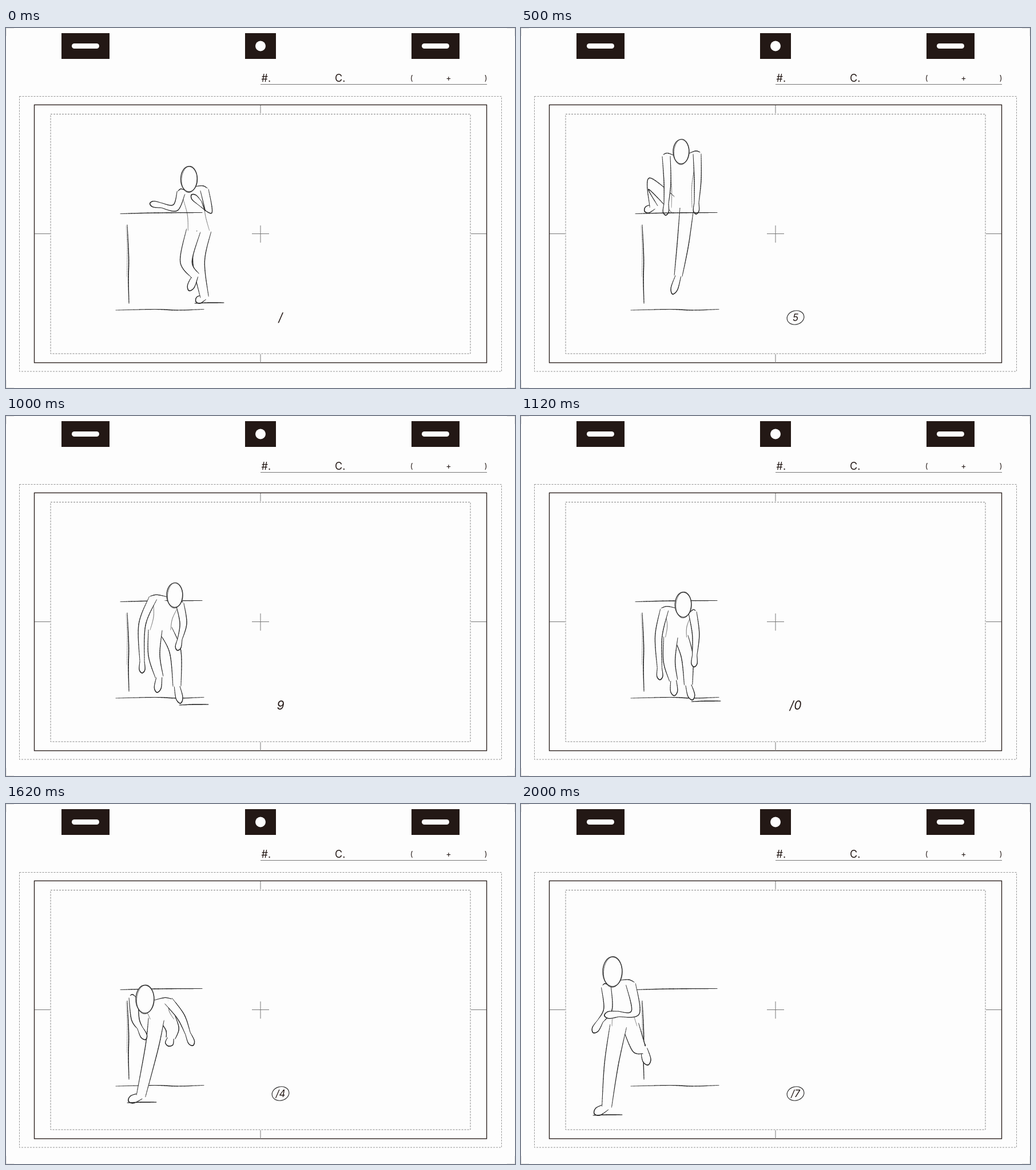
An HTML page with a canvas for the animation above (2.08 s loop, 890 px wide and 629 px high).

```html
<!DOCTYPE html>
<html lang="en">
<head>
<meta charset="utf-8">
<title>Vault over a table, pencil test</title>
<style>
html, body { margin: 0; width: 100%; height: 100%; overflow: hidden; background: #fdfdfd; }
canvas { display: block; width: 100vw; height: 100vh; }
</style>
</head>
<body>
<canvas id="stage" width="890" height="629"></canvas>
<script>
const ctx = document.getElementById('stage').getContext('2d');
const LOOP = 2080, DRAWINGS = 17, FLOOR = 470, INK = '#231815', PAPER = '#fdfdfd';
const RINGED = [5, 7, 14, 17];

// Key poses. head: centre and half width; arms: shoulder, elbow, wrist; legs: knee, ankle, toe.
const poses = {
  1: {
    head: [320, 264, 14.5], pelvis: [337, 354],
    arms: [[[306, 288], [296, 314], [272, 310]], [[347, 283], [354, 321], [339, 306]]],
    legs: [[[315, 408], [331, 433], [320, 459]], [[337, 408], [347, 470], [332, 478]]]
  },
  5: {
    head: [280, 216, 14], pelvis: [281, 314],
    arms: [[[254, 224], [256, 270], [254, 307]], [[308, 220], [309, 265], [307, 305]]],
    legs: [[[224, 272], [232, 312], [216, 320]], [[283, 378], [275, 433], [265, 465]]]
  },
  7: {
    head: [310, 226, 14], pelvis: [275, 284],
    arms: [[[268, 231], [231, 218], [192, 228]], [[317, 240], [317, 276], [311, 310]]],
    legs: [[[253, 335], [244, 390], [240, 422]], [[297, 314], [296, 333], [279, 332]]]
  },
  9: {
    head: [295, 313, 14], pelvis: [270, 374],
    arms: [[[257, 318], [238, 365], [238, 429]], [[304, 328], [310, 362], [304, 390]]],
    legs: [[[259, 418], [268, 456], [264, 483]], [[296, 412], [299, 472], [305, 502]]]
  },
  12: {
    head: [261, 363, 15], pelvis: [273, 412],
    arms: [[[238, 380], [246, 425], [251, 463]], [[292, 373], [297, 420], [303, 474]]],
    legs: [[[260, 450], [264, 474], [276, 500]], [[280, 440], [280, 465], [290, 484]]]
  },
  14: {
    head: [243, 341, 16], pelvis: [273, 376],
    arms: [[[223, 338], [226, 375], [234, 391]], [[284, 344], [306, 372], [318, 401]]],
    legs: [[[255, 425], [236, 510], [214, 519]], [[291, 394], [288, 409], [284, 423]]]
  },
  17: {
    head: [160, 293, 17], pelvis: [181, 388],
    arms: [[[149, 320], [152, 358], [139, 379]], [[192, 315], [200, 364], [170, 367]]],
    legs: [[[158, 455], [150, 529], [128, 541]], [[206, 426], [215, 428], [222, 456]]]
  }
};

const lerp = (a, b, u) => a + (b - a) * u;
const mix = (a, b, u) => typeof a === 'number' ? lerp(a, b, u) : a.map((v, i) => mix(v, b[i], u));
const shift = ([x, y], [dx, dy], k) => [x + dx * k, y + dy * k];
const direction = ([x1, y1], [x2, y2]) => {
  const length = Math.hypot(x2 - x1, y2 - y1) || 1;
  return [(x2 - x1) / length, (y2 - y1) / length];
};
const normal = (a, b) => {
  const [dx, dy] = direction(a, b);
  return [-dy, dx];
};

// Catmull-Rom curve through a few points.
function curve(points, steps = 24) {
  const last = points.length - 1;
  const at = i => points[Math.max(0, Math.min(last, i))];
  return Array.from({ length: steps + 1 }, (_, k) => {
    const s = k / steps * last, i = Math.min(Math.floor(s), last - 1), u = s - i;
    return [0, 1].map(axis => {
      const [a, b, c, d] = [-1, 0, 1, 2].map(n => at(i + n)[axis]);
      return b + u / 2 * (c - a + u * (2 * a - 5 * b + 4 * c - d + u * (3 * (b - c) + d - a)));
    });
  });
}

// A line that presses hardest in the middle and thins toward its ends.
function pencil(points, width) {
  const tone = Math.max(40, 170 - 105 * width);
  ctx.strokeStyle = `rgb(${tone},${tone},${tone})`;
  ctx.lineCap = 'round';
  const path = curve(points);
  path.slice(1).forEach((end, i) => {
    ctx.lineWidth = width * (.6 + .5 * Math.sin(Math.PI * (i + .5) / path.length));
    ctx.beginPath();
    ctx.moveTo(...path[i]);
    ctx.lineTo(...end);
    ctx.stroke();
  });
}

function cover(points) {
  ctx.fillStyle = PAPER;
  ctx.beginPath();
  points.forEach(p => ctx.lineTo(...p));
  ctx.fill();
}

function drawLimb(joints, halfWidths, width) {
  const [left, right] = [1, -1].map(side => joints.map((joint, i) =>
    shift(joint, normal(joints[Math.max(0, i - 1)], joints[Math.min(2, i + 1)]), side * halfWidths[i])));
  cover([...curve(left), ...curve(right).reverse()]);
  pencil(left, width);
  pencil(right, width);
}

// Hand or foot: a rounded leaf from the joint to its tip.
function drawTip(joint, tip, halfWidth) {
  const across = normal(joint, tip), middle = mix(joint, tip, .7);
  const outline = [shift(joint, across, halfWidth * .8), shift(middle, across, halfWidth), tip,
    shift(middle, across, -halfWidth), shift(joint, across, -halfWidth * .8)];
  cover(curve(outline));
  pencil(outline, 1.3);
}

function drawRing(cx, cy, rx, ry, tilt, width) {
  ctx.strokeStyle = '#333';
  ctx.lineWidth = width;
  ctx.beginPath();
  ctx.ellipse(cx, cy, rx, ry, tilt, 0, 7);
  ctx.stroke();
}

function drawFigure({ head, pelvis, arms, legs }) {
  const [cx, cy, rx] = head, ry = rx * 1.53, scale = rx / 14;
  const sized = values => values.map(v => v * scale);
  const hips = [-1, 1].map(side => shift(pelvis, [side, 0], 9 * scale));

  for (const side of [1, 0]) {
    const [knee, ankle, toe] = legs[side];
    drawTip(ankle, toe, 6 * scale);
    drawLimb([hips[side], knee, ankle], sized([12, 10, 7]), 1.2);
  }

  const shoulders = arms.map(arm => arm[0]);
  cover([shoulders[0], shoulders[1], hips[1], hips[0]]);
  shoulders.forEach((shoulder, side) => {
    const out = side ? 1 : -1, hip = shift(hips[side], [out, 0], 9 * scale);
    pencil([shoulder, shift(mix(shoulder, hip, .55), [-out, 0], 4), hip], .7);
  });

  arms.forEach(([shoulder, elbow, wrist], side) => {
    drawTip(wrist, shift(wrist, direction(elbow, wrist), 20 * scale), 5 * scale);
    drawLimb([shoulder, elbow, wrist], sized([7, 6, 4]), 1.2);
    const [dx, dy] = direction([cx, cy], shoulder);
    const neck = [cx + dx * rx, cy + dy * ry], tip = shift(shoulder, [side ? 1 : -1, -.6], 5 * scale);
    pencil([neck, shift(mix(neck, tip, .6), [0, -1], 3), tip], 1.1);
  });

  ctx.fillStyle = PAPER;
  ctx.beginPath();
  ctx.ellipse(cx, cy, rx, ry, 0, 0, 7);
  ctx.fill();
  drawRing(cx, cy, rx, ry, 0, 1.4);
  drawRing(cx + .5, cy + .5, rx - 1, ry + 1, .07, .7);

  const [x, y] = legs.map(leg => leg[2]).sort((a, b) => b[1] - a[1])[0];
  if (y > FLOOR) pencil([[x - 2, y + 3], [x + 25, y + 2], [x + 49, y + 2]], 1.4);
}

function drawTable() {
  pencil([[200, 324.5], [260, 323], [343, 322.5]], 1.3);
  pencil([[192, 493], [260, 491.5], [300, 493], [346, 491.5]], 1.2);
  pencil([[212, 344], [214.5, 400], [214, 440], [215, 481]], 1.5);
  pencil([[210, 345], [212, 385], [211, 435]], .5);
}

function line(x1, y1, x2, y2, color = '#777') {
  ctx.strokeStyle = color;
  ctx.lineWidth = 1;
  ctx.beginPath();
  ctx.moveTo(x1, y1);
  ctx.lineTo(x2, y2);
  ctx.stroke();
}

function box(x, y, w, h, color, width, dash = []) {
  ctx.setLineDash(dash);
  ctx.strokeStyle = color;
  ctx.lineWidth = width;
  ctx.strokeRect(x, y, w, h);
  ctx.setLineDash([]);
}

function pegHole(center, w, holeWidth, holeHeight) {
  ctx.fillStyle = INK;
  ctx.fillRect(center - w / 2, 9, w, 45);
  ctx.fillStyle = PAPER;
  ctx.beginPath();
  ctx.roundRect(center - holeWidth / 2, 31.5 - holeHeight / 2, holeWidth, holeHeight, holeHeight / 2);
  ctx.fill();
}

function text(value, x, y, font, align = 'left') {
  ctx.font = `${font} Inter, sans-serif`;
  ctx.textAlign = align;
  ctx.fillStyle = INK;
  ctx.fillText(value, x, y);
}

function drawSheet() {
  ctx.fillStyle = PAPER;
  ctx.fillRect(0, 0, 890, 629);
  ctx.lineCap = 'butt';
  pegHole(139, 84, 48, 9);
  pegHole(445, 54, 18, 18);
  pegHole(751, 84, 48, 9);
  text('#.', 446.5, 93.5, '400 18px');
  text('C.', 575, 93.5, '400 18px');
  text('(', 709, 92, '400 13px', 'center');
  text('+', 774, 92, '400 14px', 'center');
  text(')', 839, 92, '400 13px', 'center');
  line(445, 98.5, 841, 98.5);
  box(23.5, 119.5, 843, 480.5, '#888', .9, [3, 2]);
  box(49.5, 134.3, 791, 450.5, INK, 1.3);
  box(78, 150.5, 734, 418.5, '#777', .9, [3, 2]);
  for (const [a, b] of [[50, 77], [430, 460], [813, 840]]) line(a, 359.5, b, 359.5);
  for (const [a, b] of [[135, 149], [345, 375], [570, 585]]) line(445, a, 445, b);
  for (const x of [0, 890]) for (const y of [0, 629]) {
    line(x, y, x ? 876 : 14, y, '#ccc');
    line(x, y, x, y ? 615 : 14, '#ccc');
  }
}

function drawLabel(number) {
  const ringed = RINGED.includes(number);
  if (ringed) drawRing(480, 506, 15, 12, -.25, 1.2);
  text(String(number).replaceAll('1', '/'), 480, ringed ? 512 : 513, `italic 400 ${ringed ? 17 : 21}px`, 'center');
}

function poseAt(number) {
  const keys = Object.keys(poses).map(Number);
  const from = keys.filter(k => k <= number).pop(), to = keys.find(k => k > number) || from;
  const u = (number - from) / (to - from || 1), pose = {};
  for (const part in poses[from]) pose[part] = mix(poses[from][part], poses[to][part], u);
  return pose;
}

function drawPage(number) {
  drawSheet();
  const behindTable = number <= 5;
  if (!behindTable) drawTable();
  drawFigure(poseAt(number));
  if (behindTable) drawTable();
  drawLabel(number);
}

// Eight drawings a second, with starts cut to whole hundredths.
const startOf = index => 10 * Math.floor(12.5 * index);
const origin = performance.now();
let shown = 0;
function tick() {
  const t = (performance.now() - origin) % LOOP;
  let number = 1;
  while (number < DRAWINGS && startOf(number) <= t) number++;
  if (number !== shown) drawPage(shown = number);
  requestAnimationFrame(tick);
}
tick();
</script>
</body>
</html>
```
